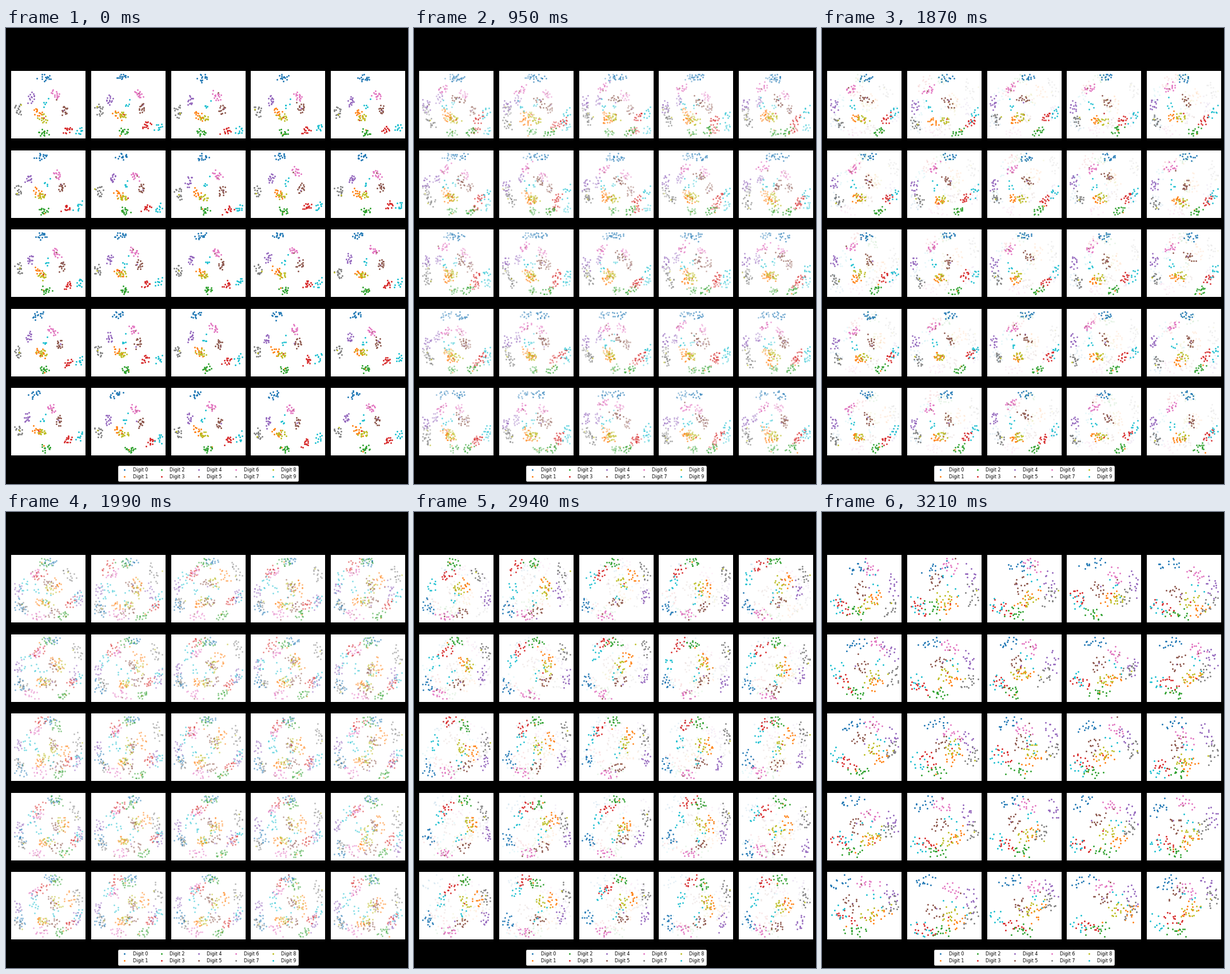
A matplotlib script that plays this animation: 703 by 797 pixels, repeating every 4010 ms.

```python
import numpy as np
import matplotlib.pyplot as plt
from matplotlib.animation import FuncAnimation
from matplotlib.patches import Rectangle

W, H, DPI = 703, 797, 64
PT = 72 / DPI                      # points per pixel
ROWS = COLS = 5
LEFT, TOP, STEP_X, STEP_Y = 9, 75.4, 139.75, 138.4
PANEL = np.array([130, 118])
TICK, HOLD, FADE, STEPS = 10, 800, 30, 10
CYCLE = HOLD + FADE * (STEPS - 1)
LOOP = 4 * HOLD + 3 * FADE * (STEPS - 1)
COLORS = [f"C{d}" for d in range(10)]
PER_DIGIT = 15
STRETCH = 1.7                      # groups are longer along the rim

# Key points: where the groups of digits 0 to 9 sit in a panel.
UPRIGHT = [(58, 11), (47, 75), (55, 107), (96, 102), (35, 49),
           (88, 68), (81, 44), (12, 67), (54, 80), (117, 102)]
CURVED = [(70, 11), (51, 88), (90, 107), (104, 85), (12, 60),
          (72, 54), (43, 33), (18, 90), (61, 84), (117, 77)]
OPPOSITE = [(16, 91), (86, 48), (59, 16), (37, 27), (115, 70),
            (73, 85), (50, 102), (111, 32), (75, 53), (25, 46)]

# Layout, mirrored, turn in degrees over the panels, group size, jitter.
STAGES = [(UPRIGHT, False, (0, -16), 3.0, 1.6),
          (CURVED, False, (0, 0), 3.5, 2.6),
          (OPPOSITE, False, (0, 14), 4.4, 5),
          (CURVED, True, (-8, -26), 6.2, 7)]


def disc(rng, n):
    """Evenly spread points in a disc."""
    i = np.arange(n) + 0.5
    r = 1.9 * np.sqrt(i / n)
    a = i * 2.39996 + rng.uniform(0, 2 * np.pi)
    return np.c_[r * np.cos(a), r * np.sin(a)] + rng.normal(0, 0.25, (n, 2))


def turned(xy, degrees):
    c, s = np.cos(np.radians(degrees)), np.sin(np.radians(degrees))
    return xy @ np.array([[c, s], [-s, c]])


def fit(xy):
    """Scale to the panel with a 5 percent margin on the data."""
    low, high = xy.min(axis=0), xy.max(axis=0)
    return PANEL * (1 + 20 * (xy - low) / (high - low)) / 22


def group(rng, centre, shape, size):
    out = centre / np.hypot(*centre)
    along = np.array([-out[1], out[0]])
    local = size * (shape + rng.normal(0, 0.35, shape.shape))
    return centre + local[:, :1] * out + STRETCH * local[:, 1:] * along


def stage_points(rng, hosts, layout, mirrored, turn, size, jitter):
    base = np.array(layout) - PANEL / 2
    if mirrored:
        base[:, 0] *= -1
    shapes = [disc(rng, PER_DIGIT) for _ in COLORS]
    panels = []
    for p in range(ROWS * COLS):
        t = p / (ROWS * COLS - 1)
        centres = turned(base, turn[0] + (turn[1] - turn[0]) * t)
        centres += rng.normal(0, jitter, centres.shape)
        groups = [group(rng, c, s, size) for c, s in zip(centres, shapes)]
        # One point of most digits lands among another digit's points.
        for digit, host in hosts.items():
            groups[digit][-1] = centres[host] + rng.normal(0, 1.2 * size, 2)
        # Part of digit 9 sits halfway between digits 1 and 6.
        groups[9][::3] += (centres[1] + centres[6]) / 2 - centres[9]
        row, col = divmod(p, COLS)
        corner = LEFT + col * STEP_X, TOP + row * STEP_Y
        panels.append(fit(np.vstack(groups)) + corner)
    points = np.reshape(panels, (ROWS * COLS, 10, PER_DIGIT, 2))
    return points.swapaxes(0, 1).reshape(10, -1, 2)


def dots(xy, color, **kw):
    return ax.plot(*xy, "o", color=color, ms=2.9 * PT, mew=0, **kw)[0]


fig = plt.figure(figsize=(W / DPI, H / DPI), dpi=DPI, facecolor="black")
ax = fig.add_axes([0, 0, 1, 1])
ax.set(xlim=(0, W), ylim=(H, 0))
ax.axis("off")

for row in range(ROWS):
    for col in range(COLS):
        corner = LEFT + col * STEP_X, TOP + row * STEP_Y
        ax.add_patch(Rectangle(corner, *PANEL, fc="white", lw=0))

rng = np.random.default_rng(11)
hosts = {d: rng.integers(1, 10) for d in (1, 2, 3, 4, 5, 6, 8)}
layers = [[dots(xy.T, c) for xy, c in zip(stage_points(rng, hosts, *stage), COLORS)]
          for stage in STAGES]

keys = [dots(([], []), c, label=f"Digit {d}") for d, c in enumerate(COLORS)]
legend = fig.legend(handles=keys, ncols=5, fontsize=8 * PT, loc="center",
                    bbox_to_anchor=(353.5 / W, 1 - 778.5 / H), borderaxespad=0,
                    labelspacing=0.35, borderpad=0.36,
                    framealpha=1, facecolor="white", edgecolor="0.8")
legend.get_frame().set_linewidth(PT)


def update(n):
    stage, rest = divmod(n * TICK, CYCLE)
    mix = 0 if rest < HOLD else ((rest - HOLD) // FADE + 1) / STEPS
    for k, layer in enumerate(layers):
        alpha = {stage: 1 - mix, stage + 1: mix}.get(k, 0)
        for line in layer:
            line.set_visible(alpha > 0)
            line.set_alpha(alpha)


anim = FuncAnimation(fig, update, frames=LOOP // TICK, interval=TICK,
                     repeat=True, repeat_delay=0, cache_frame_data=False)
plt.show()
```
